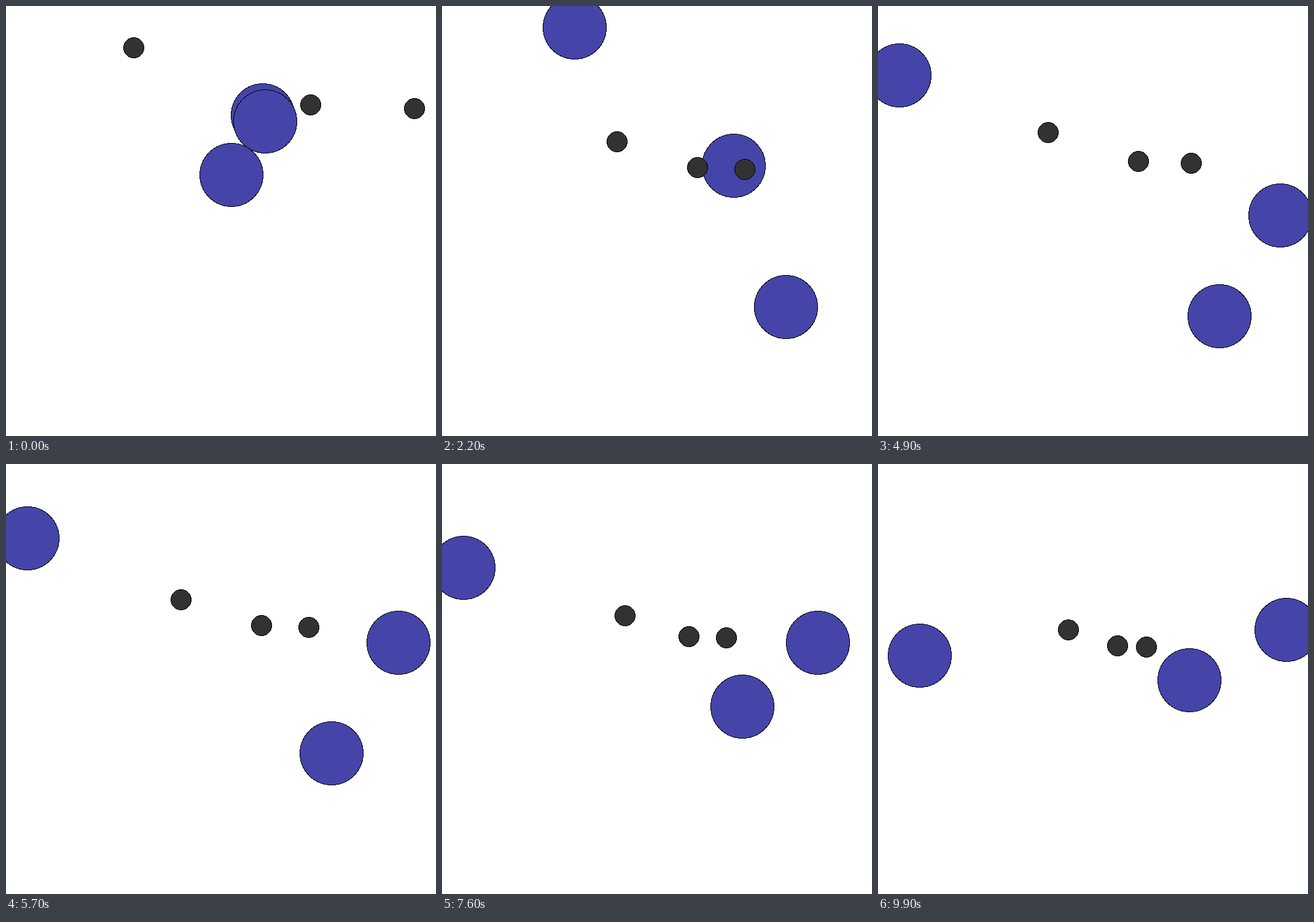
An HTML page for the animation above (10 s loop, 700x700 px).

```html
<!DOCTYPE html>
<html lang="en">
<head>
<meta charset="utf-8">
<title>Three wandering bodies</title>
<style>
  html, body { margin: 0; width: 100%; height: 100%; overflow: hidden; background: #fff; }
  svg { display: block; width: 100vw; height: 100vh; }
  circle { stroke: #000; stroke-width: 1; shape-rendering: crispEdges; }
</style>
</head>
<body>
<svg id="stage" viewBox="0 0 700 700"></svg>
<script>
const LOOP = 10000, STEP = 100;
const CENTER = { x: 350, y: 349.2 };
const FIT = { x: 315, y: 314 };

// World coordinates; the view zooms out as the bodies drift apart.
const anchors = [[-142, -281], [146, -188], [315, -182]];
const turnTimes = [0, 2.2, 3.3, 4.9, 6.6, 8.6, 9.9];
const routes = [
  [[68, -171], [-293, -690], [-535, -462], [-620, -464], [-784, -542], [-947, -399], [-1009, -131]],
  [[72, -161], [276, -195], [420, -88], [601, -15], [673, -261], [807, -59], [1129, -282]],
  [[17, -74], [462, 310], [361, 201], [406, 308], [384, 192], [392, 70], [564, 12]]
];

const secant = (values, i) =>
  (values[i + 1] - values[i]) / (turnTimes[i + 1] - turnTimes[i]);

// Harmonic mean of the neighbouring secants, flat at every turn.
function slope(values, i) {
  const before = secant(values, Math.max(i - 1, 0));
  const after = secant(values, Math.min(i, values.length - 2));
  return before * after <= 0 ? 0 : 2 * before * after / (before + after);
}

function glide(values, time) {
  const i = turnTimes.findLastIndex((t, k) => k < values.length - 1 && t <= time);
  const span = turnTimes[i + 1] - turnTimes[i];
  const u = (time - turnTimes[i]) / span, v = 1 - u;
  return v * v * (1 + 2 * u) * values[i] + u * u * (1 + 2 * v) * values[i + 1]
    + span * u * v * (v * slope(values, i) - u * slope(values, i + 1));
}

const positionOn = (route, time) =>
  [0, 1].map(axis => glide(route.map(point => point[axis]), time));

function addCircle(radius, fill) {
  const circle = document.createElementNS("http://www.w3.org/2000/svg", "circle");
  circle.setAttribute("r", radius);
  circle.setAttribute("fill", fill);
  return document.getElementById("stage").appendChild(circle);
}

const circles = [
  ...routes.map(() => addCircle(51.5, "#4545a9")),
  ...anchors.map(() => addCircle(16.5, "#323232"))
];

const toPixel = value => Math.floor(value + 1e-6);

function draw(ms) {
  const time = Math.floor((ms % LOOP) / STEP) * STEP / 1000;
  const points = [...routes.map(route => positionOn(route, time)), ...anchors];

  // The farthest point always just reaches the margin.
  const reach = Math.max(...points.map(([x, y]) =>
    Math.max(Math.abs(x) / FIT.x, Math.abs(y) / FIT.y)));

  points.forEach(([x, y], i) => {
    circles[i].setAttribute("cx", toPixel(CENTER.x + x / reach));
    circles[i].setAttribute("cy", toPixel(CENTER.y + y / reach));
  });
}

const start = performance.now();
function tick() {
  draw(performance.now() - start);
  requestAnimationFrame(tick);
}
tick();
</script>
</body>
</html>
```
